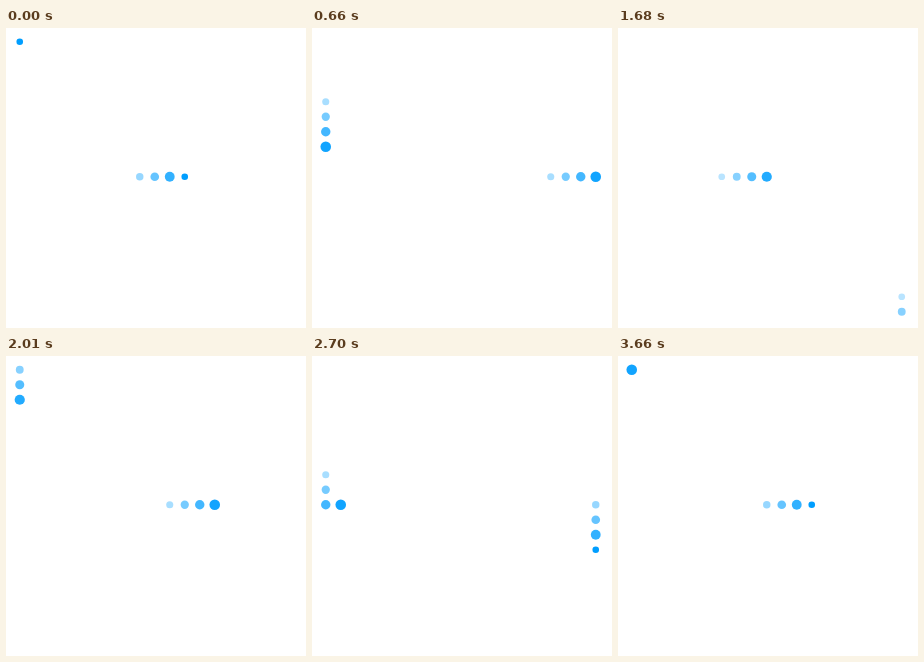
An HTML page with a canvas for the animation above (3.69 s loop, 300 px wide and 300 px high).

```html
<!DOCTYPE html>
<html lang="en">
<head>
<meta charset="utf-8">
<title>Dot trail</title>
<style>
  html, body { margin: 0; width: 100%; height: 100%; overflow: hidden; background: #fff; }
  canvas { display: block; }
</style>
</head>
<body>
<canvas width="300" height="300"></canvas>
<script>
const ctx = document.querySelector('canvas').getContext('2d');
const LOOP = 3690, TICK = 30, STEP = 90, LIFE = 360;
const GAP = 15, MARGIN = 13.75, DOTS = 37;
const waveStarts = [-1800, 0, 1770, 3630];
const clamp = (v, lo, hi) => Math.min(hi, Math.max(lo, v));

// Down the left side, across the middle, down the right side.
const dotPosition = i => [
  MARGIN + GAP * clamp(i - 9, 0, 18),
  MARGIN + GAP * (Math.min(i, 9) + Math.max(i - 27, 0)),
];

// Each dot pops in small, jumps to full size, then shrinks and fades.
function drawDot(i, age) {
  const radius = age < TICK ? 3.3 : 5.5 - 0.0065 * age;
  ctx.globalAlpha = 1 - 0.0022 * age;
  ctx.beginPath();
  ctx.arc(...dotPosition(i), radius, 0, Math.PI * 2);
  ctx.fill();
}

function draw(now) {
  const time = Math.floor((now % LOOP) / TICK) * TICK;
  ctx.clearRect(0, 0, 300, 300);
  ctx.fillStyle = '#009eff';
  for (const start of waveStarts) {
    for (let i = 0; i < DOTS; i++) {
      const age = time - start - i * STEP;
      if (age >= 0 && age < LIFE) drawDot(i, age);
    }
  }
}

const origin = performance.now();
function frame() {
  draw(performance.now() - origin);
  requestAnimationFrame(frame);
}
frame();
</script>
</body>
</html>
```
